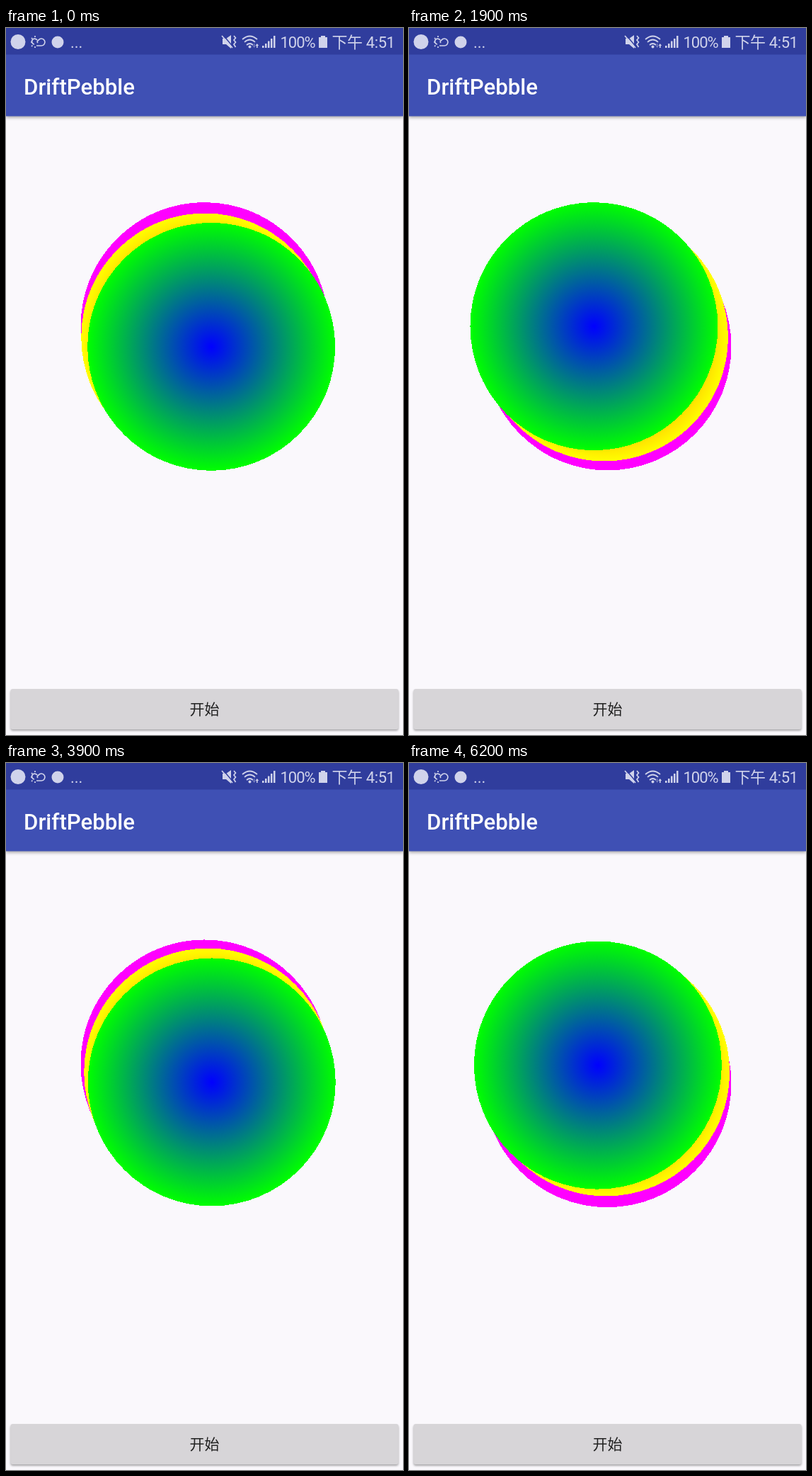
Animation, 561 px wide and 998 px high, one loop 6300 ms. Source, as an HTML page:

```html
<!DOCTYPE html>
<html lang="zh">
<head>
<meta charset="utf-8">
<title>DriftPebble</title>
<style>
  html, body { margin: 0; height: 100%; overflow: hidden; background: #faf8fc; }
  svg { display: block; width: 100%; height: 100%; }
  text { font-family: Roboto, "Noto Sans CJK SC", "Noto Sans CJK", sans-serif; }
  .status { fill: #d0d3eb; font-size: 22px; }
  .line { fill: none; stroke: #d0d3eb; stroke-width: 1.7; }
  .bar { filter: drop-shadow(0 2px 2px #0005); }
  .button { filter: drop-shadow(0 2px 1.5px #0005); }
  .bubbles { shape-rendering: crispEdges; }
</style>
</head>
<body>
<svg viewBox="0 0 561 998">
  <defs>
    <radialGradient id="red-yellow"><stop stop-color="#f00"/><stop offset="1" stop-color="#ff0"/></radialGradient>
    <radialGradient id="blue-green"><stop stop-color="#00f"/><stop offset="1" stop-color="#0f0"/></radialGradient>
  </defs>

  <rect class="bar" width="561" height="124.5" fill="#3f50b4"/>
  <rect width="561" height="37.5" fill="#303d9d"/>
  <text x="25" y="94" font-size="31.2" font-weight="500" fill="#fff">DriftPebble</text>

  <g class="status">
    <circle cx="17" cy="19.5" r="10.5"/>
    <circle cx="73" cy="20" r="8.5"/>
    <text x="91" y="28">...</text>
    <!-- weather -->
    <g class="line">
      <path d="M40 23a4 4 0 1 1 4-6M43 25h7a5 5 0 1 0-4-8q-3 2-1 4"/>
      <path d="M35 20h2M36 14l1.5 1.5M41 11v2M36 26l1.5-1.5M41 26v2"/>
    </g>
    <!-- muted speaker with vibration -->
    <path d="M306 15h5l7-5v19l-7-6h-5z"/>
    <path d="M307 10l14 17" stroke="#303d9d" stroke-width="1.5"/>
    <path class="line" d="M305 11l15 17M322 11l2.5 3-2.5 3 2.5 3-2.5 3 2.5 4"/>
    <!-- wireless -->
    <path class="line" d="M334 16q10.500-9 21 0M337 20q7.500-7 15 0M340 24q4.500-4 9 0"/>
    <circle cx="344.500" cy="26.500" r="2"/>
    <path id="down" d="M348.500 25h1.500v-3h1.500v3h1.500l-2.250 3z"/>
    <path id="up" d="M352.500 25l2.300-3 2.300 3h-1.500v3h-1.600v-3z"/>
    <!-- signal -->
    <path d="M362 25h2.500v3H362zM366 22h2.500v6H366zM370 18.500h2.500v9.500H370zM374 15h2.500v13H374zM378 11h2.500v17H378z"/>
    <text x="387.500" y="28" letter-spacing="-1">100%</text>
    <path d="M445 11h6v2h3v15h-12v-15h3z"/>
    <text x="460.500" y="28" letter-spacing="-.4">下午 4:51</text>
  </g>

  <g class="bubbles">
    <circle id="magenta" cx="280.500" cy="437" r="175" fill="#f0f"/>
    <circle id="yellow" cx="280" cy="436.500" r="175" fill="url(#red-yellow)"/>
    <circle id="green" cx="280" cy="440" r="175" fill="url(#blue-green)"/>
  </g>

  <rect class="button" x="6.500" y="933" width="548" height="57" rx="3" fill="#d7d5d8"/>
  <text x="280.500" y="969" font-size="21" text-anchor="middle" fill="#222">开始</text>
</svg>
<script>
  const LOOP = 6300, STEP = 100;
  const el = id => document.getElementById(id);
  const set = (id, attrs) => {
    for (const name in attrs) el(id).setAttribute(name, attrs[name]);
  };

  // Constant-speed swing: low at time `start`, high `half` seconds later.
  function swing(t, start, half, low, high) {
    const phase = ((t - start) / half % 2 + 2) % 2;
    return low + (high - low) * (1 - Math.abs(1 - phase));
  }

  function draw(now) {
    const t = Math.floor(now % LOOP / STEP) * STEP / 1000;
    const diagonal = swing(t, 1.93, 2.33, -19, 16.2);
    set('magenta', { cy: swing(t, 0.02, 2.06, 420.8, 452.2) });
    set('yellow', { cx: swing(t, 1.12, 2.08, 264, 296) });
    set('green', { cx: 280 + diagonal, cy: 439.7 + diagonal });

    set('up', { opacity: t >= 0.8 && t < 1.8 ? 0.4 : 1 });
    set('down', { opacity: t >= 2.8 && t < 3.8 ? 1 : 0.4 });
    requestAnimationFrame(draw);
  }
  draw(performance.now());
</script>
</body>
</html>
```
